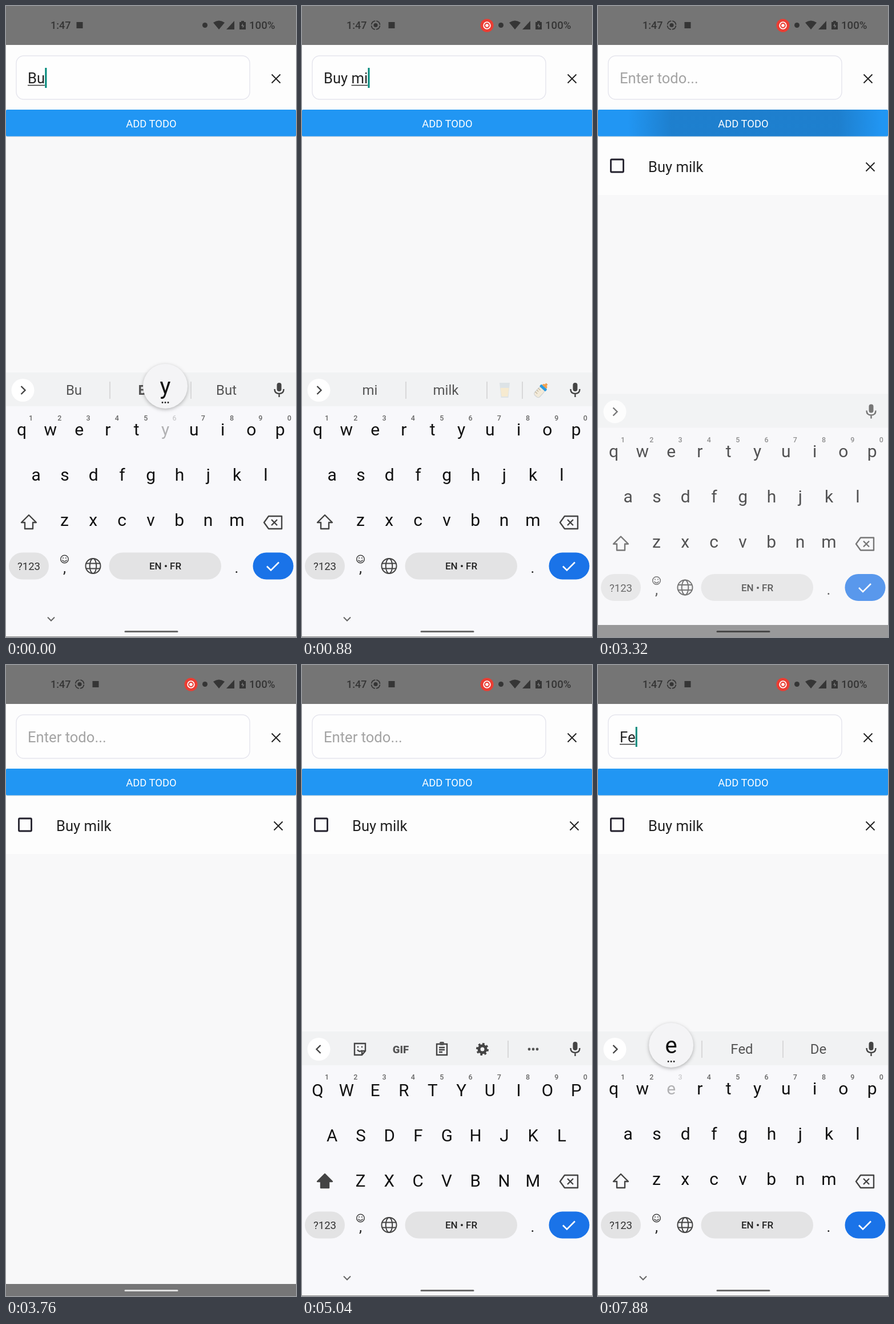
Write an HTML page that moves like this. It is 508 by 1102 pixels and loops after 8000 ms.

```html
<!DOCTYPE html>
<html lang="en">
<head>
<meta charset="utf-8">
<title>Todo list</title>
<style>
html, body { margin: 0; width: 100%; height: 100%; overflow: hidden; background: #f8f8f9; }
svg { display: block; width: 100%; height: 100%; }
text { font-family: Roboto, sans-serif; white-space: pre; }
.mid { text-anchor: middle; }
.line { fill: none; stroke: #444; stroke-width: 2.4; }
#bubble circle.disc { filter: drop-shadow(0 2px 3px rgba(0, 0, 0, .28)); }
</style>
</head>
<body>
<svg id="stage" viewBox="0 0 508 1102" xmlns="http://www.w3.org/2000/svg"></svg>
<script>
const LOOP = 8000, SIZE = 25.6, TEXT_X = 38;
const stage = document.getElementById('stage');
const ctx = document.createElement('canvas').getContext('2d');
const clamp = v => Math.max(0, Math.min(1, v));
const ramp = (t, a, b) => clamp((t - a) / (b - a));
const smooth = p => p * p * (3 - 2 * p);
const at = (list, t) => list.filter(e => e[0] <= t).pop();

// cubic-bezier(.4, 0, .2, 1)
function fastOutSlowIn(x) {
  let lo = 0, hi = 1, s = x;
  for (let i = 0; i < 20; i++) {
    s = (lo + hi) / 2;
    const bx = 1.2 * s * (1 - s) ** 2 + .6 * s * s * (1 - s) + s ** 3;
    if (bx < x) lo = s; else hi = s;
  }
  return 3 * s * s * (1 - s) + s ** 3;
}

const widthOf = s => {
  ctx.font = SIZE + 'px Roboto, sans-serif';
  return ctx.measureText(s).width;
};

// Timeline: [time, committed text, composing text]
const TYPED = [
  [0, '', 'Bu'], [80, '', 'Buy'], [440, 'Buy ', ''], [520, 'Buy ', 'm'],
  [600, 'Buy ', 'mi'], [2160, 'Buy milk ', ''], [3240, '', ''],
  [5800, '', 'F'], [6520, '', 'Fe']
];
const STRIPS = [
  [0, 'Bu', 'Buy', 'But'], [80, 'Buy', 'But', 'Buying'], [520, 'm', 'my', 'me'],
  [800, 'mi', 'milk', ''], [2260, 'and', 'for', 'from'], [3240],
  [3600], [5840, 'F', 'For', 'From'], [6560, 'Fe', 'Fed', 'De']
];
const PRESSES = [
  ['y', -200, 40], ['m', 460, 520], ['i', 560, 610],
  ['F', 5700, 5800], ['e', 6170, 6530], ['e', 7680, 8100]
];
const BLINKS = [[0], [80], [600], [2160], [2280], [4300], [5800], [6560], [7680]];

const txt = (x, y, size, s, more = '') =>
  `<text x="${x}" y="${y}" font-size="${size}" ${more}>${s}</text>`;
const cross = (x, y) =>
  `<path d="M${x - 7.5} ${y - 7.5}l15 15m0-15l-15 15" fill="none" stroke="#222" stroke-width="1.9"/>`;
const bar = (x, id = '') =>
  `<path ${id} d="M${x} 656v30" stroke="#cfcfd1" stroke-width="1.5"/>`;

const ROWS = [['qwertyuiop', 27.5, 750], ['asdfghjkl', 52.6, 829], ['zxcvbnm', 102.5, 908]];

function letters(upper) {
  return ROWS.map(([row, x0, y], r) => [...row].map((c, i) => {
    const x = x0 + i * 50.3, k = upper ? c.toUpperCase() : c;
    const digit = r ? '' : txt(x + 16, 724, 12.5, (i + 1) % 10, 'class="mid" fill="#666" font-weight="500"');
    return `<g data-key="${k}" data-x="${x}" data-y="${y}">` +
      txt(x, y + 3 * upper, upper ? 29.5 : 30, k, 'class="mid" fill="#111"') + digit + '</g>';
  }).join('')).join('');
}

const statusBar = `
  <rect width="508" height="68" fill="#757575"/>
  <g fill="#353535">
    ${txt(78, 40, 18, '1:47', 'font-weight="500"')}
    <g id="record" fill="none" stroke="#353535" stroke-width="1.8">
      <circle cx="129" cy="33.500" r="7.500" stroke-dasharray="9.800 2" stroke-dashoffset="-1"/>
      <circle cx="129" cy="33.500" r="3.600" fill="#353535" stroke="none"/>
    </g>
    <rect id="badge" x="-5.500" y="28" width="11" height="11"/>
    <circle cx="348.500" cy="33.500" r="4.500"/>
    <path d="M363 29q10-7 20 0l-10 12z"/>
    <path d="M386 41h14V26z"/>
    <path d="M409 28h3v-2h5v2h3v13h-11z"/>
    <path d="M415 30l-3 5h2.500v4l3-5H415z" fill="#757575"/>
    ${txt(426, 40, 18.6, '100%', 'font-weight="500"')}
  </g>
  <g id="cast">
    <circle r="11.500" fill="#ea3d33"/>
    <circle r="5.800" fill="none" stroke="#fff" stroke-width="1.800"/><circle r="2.800" fill="#fff"/>
  </g>`;

const page = `
  <rect width="508" height="1102" fill="#f8f8f9"/>
  <rect y="68" width="508" height="114" fill="#fdfdfd"/>
  <rect x="18" y="87" width="409" height="76" rx="13" fill="#fefefe" stroke="#e6e6ee" stroke-width="1.500"/>
  ${txt(TEXT_X, 135, SIZE, 'Enter todo...', 'id="hint" fill="#a3a3a3"')}
  ${txt(TEXT_X, 135, SIZE, '', 'id="field" fill="#222"')}
  <path id="under" stroke="#333" stroke-width="1.500"/>
  <rect id="caret" y="108" width="3" height="35" fill="#00897b"/>
  ${cross(473, 127)}
  <g id="item">
    <rect y="228" width="508" height="102" fill="#fdfdfd"/>
    <rect x="22.500" y="268" width="22" height="22" rx="1.500" fill="none" stroke="#22202c" stroke-width="2.800"/>
    ${txt(88, 289.5, SIZE, 'Buy milk', 'fill="#222"')}
    ${cross(477, 281)}
  </g>
  <rect y="182" width="508" height="46.500" rx="2" fill="#c9d3dc"/>
  <rect y="181" width="508" height="46.500" rx="2" fill="#2196f3"/>
  <g clip-path="url(#button)"><circle id="ripple" cx="275" cy="205" fill="url(#wave)"/></g>
  ${txt(254.5, 212, 18.4, 'ADD TODO', 'class="mid" fill="#fff"')}`;

const toolbar = `
  <g id="tools" fill="#555">
    <path class="line" d="M32.500 664l-7 7 7 7"/>
    <path class="line" d="M92 661h19v13l-6 7H92zM111 674h-6v7M97 672q4 5 8 1M97 667h2m5 0h2"/>
    ${txt(173, 678, 18.5, 'GIF', 'class="mid" font-weight="900"')}
    <path class="line" d="M236 662h18v19h-18zM240 668h10m-10 4h10m-10 4h6"/>
    <rect x="241" y="658" width="8" height="6" rx="2"/>
    <circle class="line" cx="316" cy="671" r="6" style="stroke-width:5"/>
    <circle class="line" cx="316" cy="671" r="9" pathLength="16" stroke-dasharray="1 1" style="stroke-width:4"/>
    ${bar(361)}
    <circle cx="398" cy="671" r="2.400"/><circle cx="405" cy="671" r="2.400"/><circle cx="412" cy="671" r="2.400"/>
  </g>`;

const suggestions = `
  <path id="more" class="line" d="M26.500 664l7 7-7 7"/>
  <g id="words" fill="#555">
    ${bar(182)}${bar(324)}
    ${[119, 252, 386].map(x => txt(x, 679, 24, '', 'class="mid"')).join('')}
  </g>
  <g id="icons">
    ${bar(386)}
    <path d="M346 658h18l-2.500 26h-13z" fill="#dde3e6"/>
    <path d="M347.500 667h15l-2 15h-11z" fill="#f6ead0"/>
    <g transform="translate(419 671) rotate(42)">
      <rect x="-6" y="-4" width="12" height="18" rx="4" fill="#f2ead9" stroke="#c9ced2"/>
      <path d="M-6 1h5m-5 4h4m-4 4h5" stroke="#b8a98f"/>
      <rect x="-7" y="-8" width="14" height="5" rx="1.500" fill="#2a9be0"/>
      <path d="M-5-8q0-4 3-4v-3h4v3q3 0 3 4z" fill="#f0a050"/>
    </g>
  </g>`;

const keyboard = `
  <g id="board">
    <rect y="640" width="508" height="462" fill="#f8f8fb"/>
    <rect y="640" width="508" height="59" fill="#f1f2f3"/>
    <circle cx="29.500" cy="671" r="20" fill="#fff"/>
    ${suggestions}${toolbar}
    <rect x="474.500" y="658" width="8" height="15" rx="4" fill="#444"/>
    <path class="line" d="M470.500 669q0 8 8 8t8-8M478.500 677v6"/>
    <g id="lower">${letters(0)}</g>
    <g id="upper">${letters(1)}</g>
    <path id="shift" class="line" d="M40 889l13 13h-6v11H33v-11h-6z" stroke-linejoin="round"/>
    <path class="line" d="M460 891h23v22h-23l-8-11zM465 897l10 10m0-10l-10 10" stroke-linejoin="round"/>
    <rect x="5" y="954.500" width="70" height="47" rx="23.500" fill="#e3e3e4"/>
    ${txt(40, 985, 18.6, '?123', 'class="mid" fill="#333"')}
    <g class="line" style="stroke-width:1.500">
      <circle cx="102.500" cy="966" r="6.800"/>
      <path d="M98.500 967.500q4 5 8 0M100 963v2m5-2v2"/>
    </g>
    ${txt(102.5, 990, 26, ',', 'class="mid" fill="#222"')}
    <g class="line" style="stroke-width:2">
      <circle cx="152.500" cy="978" r="13"/><ellipse cx="152.500" cy="978" rx="5.800" ry="13"/>
      <path d="M141 973.500h23m-23 9h23"/>
    </g>
    <rect x="180.500" y="954.500" width="196.500" height="47" rx="23.500" fill="#e3e3e4"/>
    ${txt(279, 984, 17, 'EN • FR', 'class="mid" fill="#222" font-weight="500"')}
    ${txt(404, 990, 26, '.', 'class="mid" fill="#222"')}
    <rect x="432.500" y="954.500" width="71" height="47" rx="23.500" fill="#1a73e8"/>
    <path d="M457 978.500l7 7 14-14" fill="none" stroke="#fff" stroke-width="2.600"/>
    <path class="line" d="M73 1067.500l6 6 6-6" style="stroke:#666;stroke-width:2"/>
    <g id="bubble">
      <circle class="disc" r="39" fill="#f4f4f6"/>
      ${txt(0, 14, 40, '', 'class="mid" fill="#111"')}
      <path d="M-5 28.500h.1m4.900 0h.1m4.900 0h.1" stroke="#222" stroke-width="2.800" stroke-linecap="round"/>
    </g>
  </g>`;

stage.innerHTML = `
  <defs>
    <clipPath id="button"><rect y="181" width="508" height="46.500" rx="2"/></clipPath>
    <radialGradient id="wave">
      <stop offset=".66" stop-color="#174f80" stop-opacity=".32"/>
      <stop offset="1" stop-color="#174f80" stop-opacity="0"/>
    </radialGradient>
  </defs>
  ${page}${statusBar}${keyboard}
  <rect id="nav" y="1081" width="508" height="21"/>
  <path id="edge" d="M0 1101.500h508" stroke="#888"/>
  <path id="handle" d="M209 1092.500h91" stroke-width="3" stroke-linecap="round"/>`;

const $ = id => document.getElementById(id);
const set = (id, name, v) => $(id).setAttribute(name, v);
const show = (id, on) => set(id, 'display', on ? 'inline' : 'none');
const words = [...$('words').querySelectorAll('text')];
const keys = {};
document.querySelectorAll('[data-key]').forEach(g => keys[g.dataset.key] = g);

function drawStatus(t) {
  set('badge', 'transform', `translate(${129 + 28 * smooth(ramp(t, 120, 610))} 0)`);
  set('record', 'opacity', ramp(t, 420, 600));
  set('cast', 'transform', `translate(324 34) scale(${smooth(ramp(t, 80, 320))})`);
}

function drawField(t) {
  const [, done, part] = at(TYPED, t), full = done + part;
  const x0 = TEXT_X + widthOf(done), x1 = TEXT_X + widthOf(full);
  $('field').textContent = full;
  show('hint', !full);
  show('under', part);
  set('under', 'd', `M${x0} 138.500H${x1}`);
  const lit = Math.floor((t - at(BLINKS, t)[0]) / 520) % 2 === 0;
  show('caret', lit && (t < 3240 || t >= 4300));
  set('caret', 'x', x1 + .3);
}

function drawButton(t) {
  show('item', t >= 3240);
  set('ripple', 'r', 70 + 180 * smooth(ramp(t, 3140, 3380)));
  set('ripple', 'opacity', ramp(t, 3140, 3220) * (1 - ramp(t, 3330, 3520)));
}

function drawStrip(t) {
  const strip = at(STRIPS, t), filled = strip.length > 1;
  const tools = t >= 3600 && t < 5840;
  show('words', filled);
  show('tools', tools);
  show('more', !tools);
  show('icons', strip[3] === '');
  words.forEach((w, i) => {
    w.textContent = strip[i + 1] || '';
    w.setAttribute('font-weight', i === 1 && t < 80 ? 700 : 400);
  });
}

function drawKeys(t) {
  const caps = t >= 3600 && t < 5840;
  show('lower', !caps);
  show('upper', caps);
  set('shift', 'style', caps ? 'fill:#444' : '');
  const press = PRESSES.find(([, a, b]) => t >= a && t < b + 80);
  for (const k in keys) keys[k].setAttribute('opacity', press && press[0] === k && t < press[2] ? .3 : 1);
  show('bubble', press);
  if (!press) return;
  const [k, down, up] = press, { x, y } = keys[k].dataset;
  const grow = smooth(ramp(t, down, down + 60));
  $('bubble').querySelector('text').textContent = k;
  set('bubble', 'transform', `translate(${x} ${y - 86}) scale(${.7 + .3 * grow})`);
  set('bubble', 'opacity', grow * (1 - ramp(t, up, up + 80)));
}

function drawBoard(t) {
  const hide = ramp(t, 3264, 3464), rise = ramp(t, 4327, 4612);
  const away = t < 4000;
  const shift = 462 * (away ? hide ** 2 : 1 - fastOutSlowIn(rise));
  set('board', 'transform', `translate(0 ${shift})`);
  set('board', 'opacity', away ? 1 - hide : .25 + .75 * rise);
  const dim = away ? ramp(t, 3240, 3350) : 1 - ramp(t, 4450, 4640);
  set('nav', 'opacity', .52 * dim);
  show('edge', dim === 0);
  set('handle', 'stroke', t > 3360 && t < 4540 ? '#dedede' : t > 3240 && t < 3361 ? '#484848' : '#6a6a6a');
}

function render(t) {
  [drawStatus, drawField, drawButton, drawStrip, drawKeys, drawBoard].forEach(f => f(t));
}

function tick() {
  render(performance.now() % LOOP);
  requestAnimationFrame(tick);
}
tick();
</script>
</body>
</html>
```
